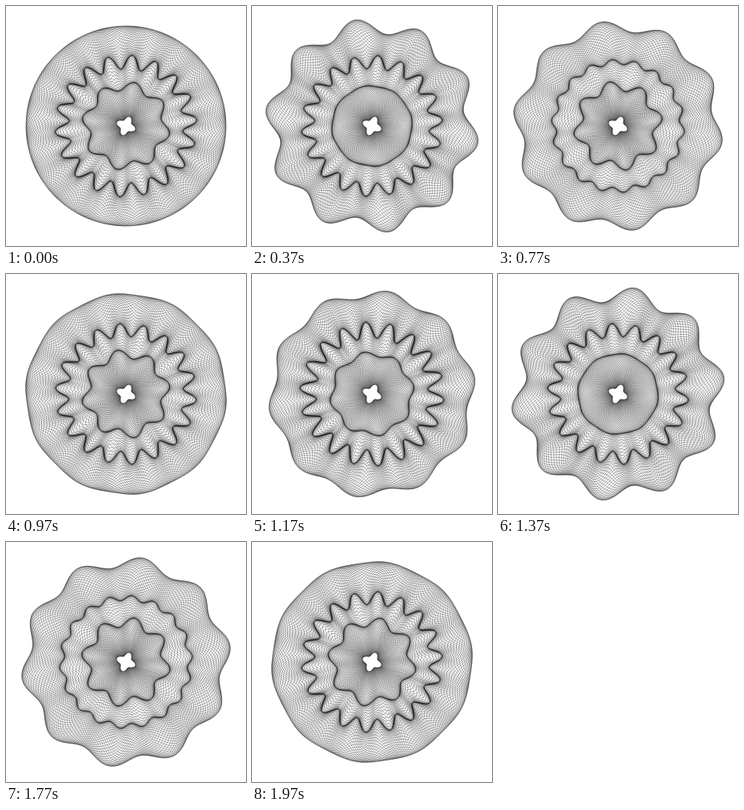
An HTML page with a canvas for the animation above (2.01 s loop, 300 px wide and 300 px high).

```html
<!DOCTYPE html>
<html lang="en">
<head>
<meta charset="utf-8">
<title>Guilloche rosette</title>
<style>
html, body { margin: 0; width: 100%; height: 100%; overflow: hidden; background: #fff; }
canvas { display: block; width: 300px; height: 300px; }
</style>
</head>
<body>
<canvas id="stage" width="300" height="300"></canvas>
<script>
const ctx = document.getElementById('stage').getContext('2d');
const TAU = Math.PI * 2;
const LOOP = 2010;
const STEPS = 60;

// Each envelope is a circle with a standing wave; the waves are a third of a loop apart.
const rings = [
  { radius: 125, swing: 10, lobes: 10, phase: 0 },
  { radius: 80, swing: 10, lobes: 18, phase: TAU * 2 / 3 },
  { radius: 50, swing: 6, lobes: 8, phase: TAU / 3 },
  { radius: 10, swing: 2.5, lobes: 4, still: true }
];

// One closed thread per band: waves oscillations spread over turns.
const bands = [
  { waves: 149, turns: 40 },
  { waves: 67, turns: 28 },
  { waves: 101, turns: 40 }
];
const POINTS = 360;

function envelope(ring, angle) {
  const amp = ring.still ? 1 : Math.sin(angle + ring.phase);
  return Float64Array.from({ length: POINTS }, (_, i) =>
    ring.radius + ring.swing * amp * Math.sin(ring.lobes * TAU * i / POINTS));
}

function drawBand(outer, inner, { waves, turns }) {
  const total = POINTS * turns;
  ctx.beginPath();
  for (let i = 0; i < total; i++) {
    const k = i % POINTS;
    const a = TAU * k / POINTS;
    const mix = (1 + Math.cos(TAU * waves * i / total)) / 2;
    const r = inner[k] + (outer[k] - inner[k]) * mix;
    ctx.lineTo(150 + r * Math.cos(a), 150 + r * Math.sin(a));
  }
  ctx.closePath();
  ctx.stroke();
}

function draw(step) {
  ctx.fillStyle = '#fff';
  ctx.fillRect(0, 0, 300, 300);
  ctx.strokeStyle = '#000';
  ctx.lineWidth = 0.3;
  ctx.lineJoin = 'round';
  const curves = rings.map(ring => envelope(ring, TAU * step / STEPS));
  bands.forEach((band, i) => drawBand(curves[i], curves[i + 1], band));
}

const start = performance.now();
let shown = -1;

function tick() {
  const t = (performance.now() - start) % LOOP;
  // Steps last 30, 40 and 30 ms in turn.
  const step = Math.min(STEPS - 1, Math.floor((Math.floor(t / 10) + 0.5) * 0.3));
  if (step !== shown) draw(shown = step);
  requestAnimationFrame(tick);
}
tick();
</script>
</body>
</html>
```
